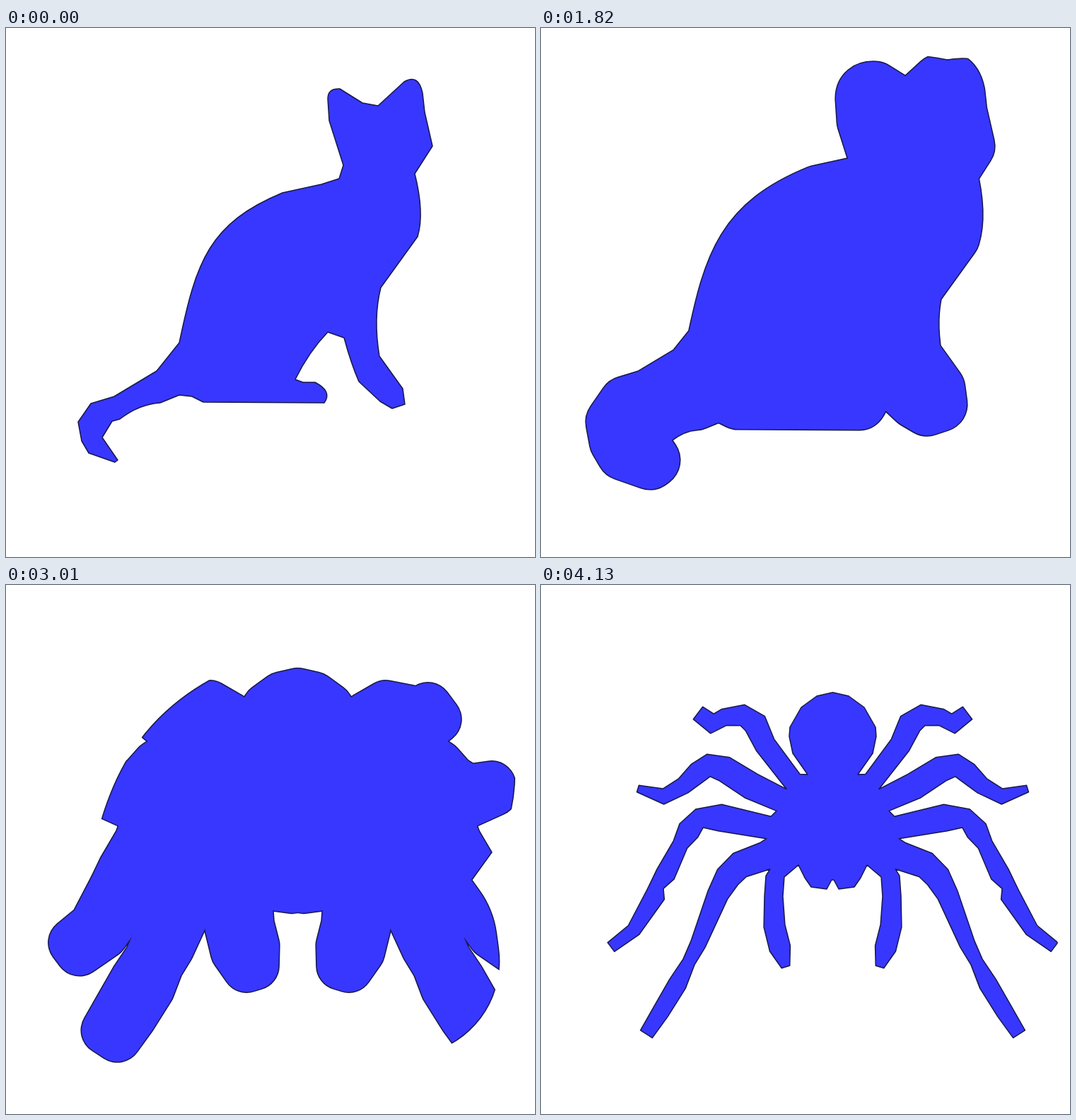
An HTML page with a canvas for the animation above (4830 ms loop, 748 by 748 pixels).

```html
<!DOCTYPE html>
<html lang="en">
<head>
<meta charset="utf-8">
<title>Cat to spider morph</title>
<style>
  html, body { margin: 0; height: 100%; overflow: hidden; background: #fff; }
  canvas { display: block; }
</style>
</head>
<body>
<canvas id="stage" width="748" height="748"></canvas>
<script>
const SIZE = 748, HOLD = 700, STEP = 70, STEPS = 50;
const LOOP = 2 * HOLD + (STEPS - 1) * STEP;
const REACH = 168;        // Hausdorff distance between the two shapes
const HALF_LINE = 0.75;
const FILL = '#3737ff', LINE = '#18184a';

// Clockwise from the left ear: head, chest, paws, tail, back.
const cat = new Path2D(`
  M455,100 Q455,85 472,86 L504,106 526,110 563,76 Q583,64 589,92
  L592,119 603,167 578,206 Q592,262 582,295 L530,367 Q519,410 528,464
  L561,510 564,532 546,538 529,528 499,500 Q488,475 478,438
  L455,430 Q428,458 409,497 L420,501 437,501 Q462,514 450,530
  L279,529 263,521 245,519 218,530 Q188,532 161,553
  L150,556 136,579 158,611 154,614 117,601 107,584 102,557 120,531 153,521 213,485 245,445
  C269,330 287,276 391,233 L446,221 471,213 477,194 457,131 Z`);

// Outline of a limb from [x, y, half width] joints: out along one edge, back along the other.
function limb(...joints) {
  const edge = side => joints.map(([x, y, half], i) => {
    const [x0, y0] = joints[Math.max(i - 1, 0)];
    const [x1, y1] = joints[Math.min(i + 1, joints.length - 1)];
    const k = side * half / Math.hypot(x1 - x0, y1 - y0);
    return [x - (y1 - y0) * k, y + (x1 - x0) * k];
  });
  return [...edge(1), ...edge(-1).reverse()];
}

// Left half of the spider from the top of the head down to the jaws.
const halfSpider = [
  [412, 152], [390, 157], [368, 173], [352, 201], [351, 214], [356, 238], [377, 268],
  ...limb([355, 276, 14], [317, 226, 15], [303, 196, 17], [285, 184, 15], [259, 187, 12],
    [242, 196, 14], [222, 181, 11]),
  ...limb([340, 304, 17], [297, 284, 19], [259, 260, 18], [237, 255, 16], [222, 265, 15],
    [201, 284, 12], [173, 299, 11], [137, 288, 5]),
  ...limb([322, 343, 16], [253, 329, 19], [224, 330, 14], [209, 347, 16], [197, 367, 11],
    [176, 409, 14], [164, 425, 10], [162, 438, 14], [131, 488, 10], [99, 512, 8]),
  ...limb([317, 383, 20], [281, 396, 19], [264, 413, 18], [250, 438, 15], [222, 508, 11],
    [209, 533, 9], [193, 564, 13], [169, 604, 12], [149, 635, 10]),
  ...limb([331, 412, 13], [329, 440, 13], [330, 482, 15], [338, 514, 15], [346, 540, 6]),
  [364, 396], [373, 414], [382, 427], [404, 430], [411, 417]
];
const mirrored = halfSpider.map(([x, y]) => [825 - x, y]).reverse();
const spider = new Path2D('M' + [...halfSpider, ...mirrored].join(' ') + 'Z');

const stage = document.getElementById('stage').getContext('2d');

function layer() {
  const canvas = document.createElement('canvas');
  canvas.width = canvas.height = SIZE;
  const ctx = canvas.getContext('2d');
  ctx.lineJoin = 'round';
  return ctx;
}
const catLayer = layer(), spiderLayer = layer();

// Fills a path grown by r, or shrunk when r is negative.
function grow(ctx, path, r, color) {
  ctx.globalCompositeOperation = 'source-over';
  ctx.clearRect(0, 0, SIZE, SIZE);
  ctx.fillStyle = ctx.strokeStyle = color;
  ctx.fill(path);
  if (!r) return;
  if (r < 0) ctx.globalCompositeOperation = 'destination-out';
  ctx.lineWidth = 2 * Math.abs(r);
  ctx.stroke(path);
}

function drawOverlap(catR, spiderR, color) {
  grow(catLayer, cat, catR, color);
  grow(spiderLayer, spider, spiderR, color);
  catLayer.globalCompositeOperation = 'destination-in';
  catLayer.drawImage(spiderLayer.canvas, 0, 0);
  stage.drawImage(catLayer.canvas, 0, 0);
}

const ease = p => p < 0.5 ? 2 * p * p : 1 - 2 * (1 - p) ** 2;

function draw(step) {
  const r = REACH * ease(step / STEPS), rest = REACH - r;
  stage.fillStyle = '#fff';
  stage.fillRect(0, 0, SIZE, SIZE);
  drawOverlap(r + HALF_LINE, rest + HALF_LINE, LINE);
  drawOverlap(r - HALF_LINE, rest - HALF_LINE, FILL);
}

let shown = -1;
function tick() {
  const t = performance.now() % LOOP;
  const step = Math.min(STEPS, Math.max(0, Math.floor((t - HOLD) / STEP) + 1));
  if (step !== shown) draw(shown = step);
  requestAnimationFrame(tick);
}
tick();
</script>
</body>
</html>
```
